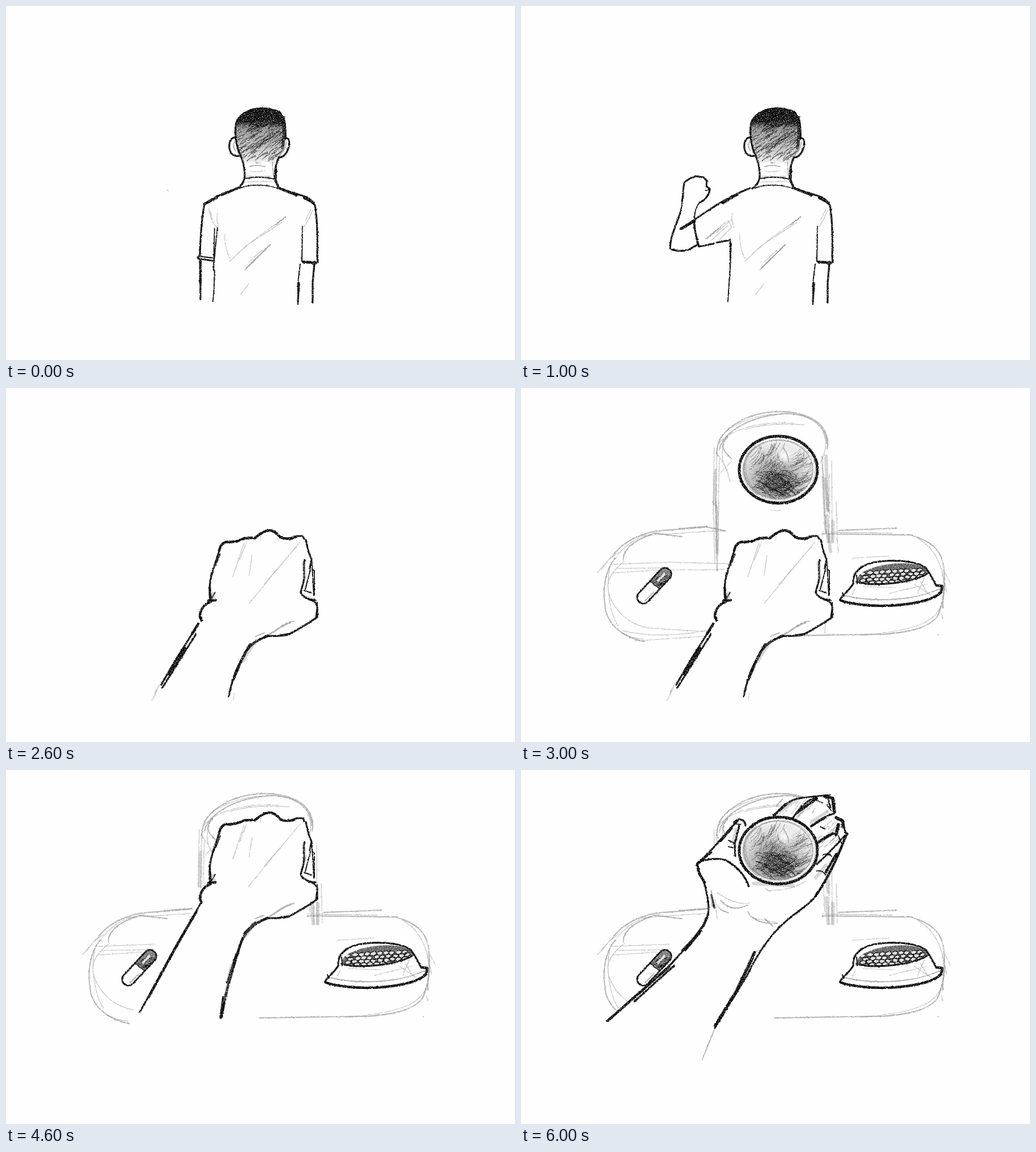
An HTML page that plays this animation: 898x624 px, repeating every 7 s.

```html
<!DOCTYPE html>
<html lang="en">
<head>
<meta charset="utf-8">
<title>Reaching hand</title>
<style>
html, body { margin: 0; width: 100%; height: 100%; overflow: hidden; background: #fefefe; }
svg { display: block; width: 898px; height: 624px; }
path, ellipse, rect { fill: none; stroke: #0c0c0c; stroke-width: 3.2; stroke-linecap: round; stroke-linejoin: round; }
.thin { stroke-width: 2; }
.bold { stroke-width: 4.4; }
.heavy { stroke-width: 5.6; }
.faint { stroke: #777; stroke-width: 1.1; opacity: .5; }
.soft { stroke: #777; stroke-width: 1.9; opacity: .6; }
.smudge { stroke: #777; stroke-width: 6; opacity: .32; }
.hatch { stroke-width: 1; }
.paper { fill: #fefefe; stroke: none; }
.shade { stroke: none; }

.shot {
  filter: url(#charcoal);
  visibility: hidden;
  animation: show1 7s step-end infinite;
  animation-delay: calc(var(--at) * 1s - 7s);
}
.for2 { animation-name: show2; }
.for4 { animation-name: show4; }
@keyframes show1 { 0% { visibility: visible } 14.2857%, 100% { visibility: hidden } }
@keyframes show2 { 0% { visibility: visible } 28.5714%, 100% { visibility: hidden } }
@keyframes show4 { 0% { visibility: visible } 57.1428%, 100% { visibility: hidden } }
</style>
</head>
<body>
<svg viewBox="0 0 898 624">
<defs>
  <!-- rough edges, then white paper grain on top of the ink -->
  <filter id="charcoal" filterUnits="userSpaceOnUse" x="0" y="0" width="898" height="624" color-interpolation-filters="sRGB">
    <feTurbulence type="fractalNoise" baseFrequency=".3" numOctaves="2" seed="4"/>
    <feColorMatrix values="1 0 0 0 0  0 1 0 0 0  0 0 1 0 0  0 0 0 0 1" result="wob"/>
    <feDisplacementMap in="SourceGraphic" in2="wob" scale="2.6" xChannelSelector="R" yChannelSelector="G" result="rough"/>
    <feTurbulence type="fractalNoise" baseFrequency=".6" numOctaves="2" seed="9"/>
    <feColorMatrix values="0 0 0 0 1  0 0 0 0 1  0 0 0 0 1  0 0 0 4 -2.3" result="grain"/>
    <feComposite in="grain" in2="rough" operator="atop"/>
  </filter>
  <linearGradient id="hair" x2="0" y2="1">
    <stop offset="0" stop-color="#0c0c0c"/>
    <stop offset=".22" stop-color="#0c0c0c" stop-opacity=".95"/>
    <stop offset=".36" stop-color="#222" stop-opacity=".5"/>
    <stop offset=".7" stop-color="#222" stop-opacity=".28"/>
    <stop offset="1" stop-color="#222" stop-opacity=".05"/>
  </linearGradient>
  <radialGradient id="ball" gradientUnits="userSpaceOnUse" cx="448" cy="168" r="82">
    <stop offset="0" stop-color="#222" stop-opacity=".8"/>
    <stop offset=".35" stop-color="#444" stop-opacity=".5"/>
    <stop offset=".7" stop-color="#777" stop-opacity=".3"/>
    <stop offset="1" stop-color="#999" stop-opacity=".05"/>
  </radialGradient>
  <radialGradient id="gleam">
    <stop offset="0" stop-color="#fefefe"/>
    <stop offset="1" stop-color="#fefefe" stop-opacity="0"/>
  </radialGradient>
  <path id="skull" class="shade" d="M413 266C406 250 403 225 406 207C409 195 420 187 436 182C455 178 474 181 484 190C492 197 494 212 493 232C492 250 487 262 481 270C476 280 470 281 466 277C452 273 432 274 420 279Z" style="fill:url(#hair)"/>
  <path id="food" class="shade" d="M592 339C594 320 640 309 670 309C695 309 714 314 717 324C714 335 680 343 640 346C615 347 595 345 592 339Z" style="fill:#666"/>
  <clipPath id="hairClip"><use href="#skull"/></clipPath>
  <clipPath id="foodClip"><use href="#food"/></clipPath>
  <clipPath id="ballClip"><ellipse cx="454" cy="144" rx="61" ry="52"/></clipPath>

  <g id="orb">
    <ellipse class="paper" cx="454" cy="144" rx="69" ry="60"/>
    <g clip-path="url(#ballClip)">
      <ellipse class="shade" cx="454" cy="144" rx="61" ry="52" style="fill:url(#ball)"/>
      <path class="hatch" opacity=".45" data-hatch="65,402,118,50,62,-55,30,5,6"/>
      <path class="hatch" opacity=".65" data-hatch="60,412,145,55,40,32,32,6,-6"/>
      <path class="hatch" opacity=".55" data-hatch="40,435,165,55,26,-25,30,7,6"/>
      <path class="hatch" opacity=".35" data-hatch="42,470,118,34,55,-32,28,8,6"/>
      <ellipse class="shade" cx="464" cy="119" rx="26" ry="18" style="fill:url(#gleam)"/>
    </g>
    <path class="smudge" d="M413 104C385 125 390 165 418 186"/>
    <ellipse class="soft" cx="454" cy="144" rx="61" ry="52"/>
    <ellipse class="faint" cx="455" cy="145" rx="64" ry="54"/>
    <ellipse cx="454" cy="144" rx="69" ry="59" style="stroke-width:5"/>
    <path d="M388 165C402 192 435 206 470 202C498 196 516 178 521 156"/>
    <path class="soft" d="M453 117Q452 128 463 132M463 106Q472 118 472 130"/>
  </g>

  <g id="hand">
    <path class="paper" d="M376 290C378 276 386 269 393 272L435 264C445 260 452 251 464 251C474 251 480 258 484 263C492 267 504 266 524 261L534 290L543 330L545 372L550 390L547 405C535 415 515 425 500 434L458 437L420 475L344 410L345 390L360 374L357 345Z"/>
    <path class="bold" d="M376 287C378 276 386 269 393 272L408 270L420 265L434 264M438 265C446 260 452 252 464 251C474 251 480 258 484 263C492 267 504 266 512 262"/>
    <path d="M511 261L524 261L526 266M529 268L534 290L539 302L536 318M376 288L368 312C362 330 357 345 360 373"/>
    <path class="thin" d="M378 292L370 313M360 345L362 372L369 360M539 302L541 328L543 366M541 320L544 322L544 365M537 320L528 355M526 357L539 361"/>
    <path d="M527 303C523 318 529 330 524 345L520 360C522 368 535 374 546 374"/>
    <path class="smudge" d="M525 308L527 335M365 362L367 372"/>
    <path class="bold" d="M357 375L370 374M361 377C350 381 343 390 342 402L345 410"/>
    <path d="M535 373C546 375 550 383 549 390L547 405C535 415 515 425 500 434C490 438 470 437 458 437"/>
    <path class="thin" d="M549 378L550 404L543 408M480 436L505 432"/>
    <path class="soft" d="M455 438C470 434 488 414 508 411M466 434C478 428 490 416 502 414M440 438L455 432"/>
    <path class="faint" d="M519 271L428 381M513 279L455 346M420 273Q411 300 400 333M424 272L412 303M434 295L429 330M450 258L449 268"/>
  </g>
</defs>

<!-- standing figure -->
<g class="shot for2" style="--at:0">
  <use href="#skull"/>
  <g clip-path="url(#hairClip)">
    <path class="hatch" data-hatch="130,398,205,90,70,-35,24,1,-3" opacity=".75"/>
    <path class="hatch" data-hatch="45,404,185,85,30,-10,26,2,-3"/>
    <path class="heavy" d="M484 188C491 205 492 230 488 250" opacity=".7"/>
  </g>
  <path d="M414 265C405 245 403 222 406 207C409 195 420 187 436 182C455 178 474 181 484 190C492 197 494 214 493 234"/>
  <path class="thin" d="M474 183L484 187L487 194L491 196L492 208"/>
  <path d="M405 232C397 231 393 240 394 250C396 262 403 266 412 264M494 233C500 232 501 242 498 251C495 261 489 266 483 267"/>
  <path class="soft" d="M404 238Q398 246 405 256M495 240Q493 248 488 258M490 248L483 264"/>
  <path d="M414 264C418 275 422 285 421 302C420 312 413 318 408 322M482 266C477 275 474 288 474 303C476 313 480 319 484 323"/>
  <path class="thin" d="M422 304Q447 299 474 305M413 321C430 314 462 314 480 322M477 280L477 308M476 306L481 318"/>
  <path class="soft" d="M430 283Q444 279 457 283M441 276L449 277M470 275L472 300"/>
  <path class="faint" d="M430 291Q444 294 457 290M424 300L468 300M420 310L470 309"/>
  <path d="M480 320C500 328 520 333 530 337C540 342 545 348 546 356C549 380 550 410 549 440L550 452"/>
  <path class="bold" d="M486 323L512 333M526 338L543 347M524 451L547 453"/>
  <path class="thin" d="M523 389L522 450L548 451M540 348L546 352M519 455L515 488L515 526"/>
  <path d="M544 455L541 488L541 523M517 488L515 521"/>
  <path class="faint" d="M541 360Q531 386 521 392M538 358L528 378M494 371C470 391 436 408 395 450M487 381L420 425M467 420L421 466M452 430L428 452M428 490L414 509M386 402Q385 425 395 445M373 365Q370 380 376 390"/>
  <path class="soft" d="M493 372L475 386M466 421L424 462"/>
</g>

<g class="shot" style="--at:0">
  <path d="M414 319C390 328 362 338 350 350C345 375 343 410 342 440L338 444"/>
  <path class="bold" d="M407 322L380 333M372 338L350 349M343 450L343 488"/>
  <path d="M343 486L343 517M338 445L364 449"/>
  <path class="thin" d="M340 441L364 444M373 391L369 430L366 466M368 392L366 465M368 465L367 500L365 521"/>
  <path class="faint" d="M357 354Q361 380 372 390M360 360L364 376M284 325L288 326"/>
</g>

<g class="shot" style="--at:1">
  <path d="M404 321C376 332 345 350 325 364L281 393"/>
  <path class="bold" d="M382 332L356 347M304 380L284 392"/>
  <path d="M284 344C287 335 285 318 289 310L300 303L308 300L322 302L328 308L327 318L333 322C333 332 325 342 316 346"/>
  <path class="thin" d="M316 346C309 352 306 365 306 378M284 344C285 353 280 368 274 382M326 325L333 323L330 335"/>
  <path d="M281 364C275 385 263 405 263 428C275 433 285 433 297 429L311 421"/>
  <path d="M307 377C304 390 310 408 314 424M314 424L340 419M345 417L367 413"/>
  <path class="thin" d="M304 380L311 419M369 411L369 460L365 521M371 418L368 480"/>
  <path class="faint" d="M328 411L362 380M336 413L366 386M350 412L370 392M344 400L372 376M365 378L372 390"/>
  <path class="soft" d="M326 410L352 390"/>
</g>

<!-- counter with capsule and bowl -->
<g class="shot for4" style="--at:3">
  <path class="soft" d="M346 120C342 85 370 65 400 52C435 38 480 38 510 52C535 64 545 85 540 108M350 110C352 82 400 48 470 45C518 47 538 72 540 98M372 125C352 108 352 98 365 86"/>
  <path class="faint" d="M347 100C370 70 430 58 480 62M349 92C362 66 415 46 455 46M345 115Q365 140 368 165M358 98Q350 125 364 145M352 150L372 128M395 73Q440 60 500 65M532 78Q545 100 528 132"/>
  <path class="faint" d="M341 105L339 206M345 120L344 208M350 125L348 205M531 155L536 250M548 128L549 270M556 200L558 270M544 150L543 272"/>
  <path class="smudge" d="M343 145L342 205M536 160L542 215M539 225L542 271M550 235L550 271"/>
  <path class="soft" d="M160 298C175 275 205 258 240 252L328 245M278 248L328 244M531 257L690 259M560 251L662 247M234 256L284 262"/>
  <path class="faint" d="M215 260L325 253M163 305C185 270 215 258 245 255M136 325Q154 300 172 290M142 320L158 298M160 311L262 307M162 326L240 321M170 318L252 317M532 254L655 256M585 300L650 296"/>
  <path class="soft" d="M231 258C195 270 178 288 181 304M166 300C146 325 143 360 150 395C158 420 180 440 218 447"/>
  <path class="faint" d="M182 306C150 330 148 352 160 375C175 405 200 418 225 423M157 315C148 350 158 400 172 420M176 430Q195 442 216 443"/>
  <path class="soft" d="M690 260C725 270 745 290 746 320C750 350 745 380 735 402C720 422 690 430 640 434M640 434L447 437M745 350L744 388"/>
  <path class="faint" d="M700 265C735 285 750 325 745 370C738 410 705 427 600 436M748 325L758 345M742 318L751 360M742 398L744 408M735 434L737 436"/>
  <g transform="translate(235 348.5) rotate(-47)">
    <rect class="paper" x="-39" y="-11" width="78" height="22" rx="11"/>
    <path class="shade" style="fill:#777" d="M2-10H28Q38-8 38 0T28 10H2Z"/>
    <path class="hatch" data-hatch="14,3,-8,24,15,15,12,11,1"/>
    <rect class="paper" x="9" y="-3" width="20" height="4" rx="2" opacity=".8"/>
    <rect x="-39" y="-11" width="78" height="22" rx="11" style="stroke-width:2.8"/>
    <path class="thin" d="M1-11L2 11"/>
    <path class="soft" d="M-30 6L-8 7"/>
  </g>
  <path class="paper" d="M583 345C584 325 600 313 620 308C650 302 695 303 714 318L733 348L743 349L741 360C730 372 700 380 660 383C620 386 580 380 563 373Z"/>
  <use href="#food"/>
  <path id="pebbles" clip-path="url(#foodClip)" style="fill:#ddd;stroke-width:1.3"/>
  <path d="M586 345C584 325 600 313 620 308C650 302 695 303 714 317C720 325 728 338 732 348"/>
  <path d="M592 342C620 350 690 345 717 327M586 345C580 356 572 360 564 371"/>
  <path class="bold" d="M563 374C580 381 620 386 660 383C700 380 730 372 741 360L743 349L733 348"/>
  <path class="thin" d="M567 361L570 367M592 330L593 345"/>
  <path class="soft" d="M572 366C615 377 690 377 738 354"/>
  <path class="faint" d="M590 352L584 366M694 346L724 366M704 340L716 360M650 362L716 346M712 334L700 362M604 350L660 352"/>
</g>

<g class="shot" style="--at:3">
  <path class="soft" d="M344 200L346 322M328 245L360 252M531 120L538 256"/>
  <path class="faint" d="M339 200L342 310M349 200L347 295M320 253L362 252M262 307L368 310M240 321L360 320M180 428C230 440 290 436 332 426M200 446L330 437M225 423L332 430M538 370L536 432M557 265L560 290M440 214Q448 218 458 215"/>
  <path class="smudge" d="M538 120L541 216M543 260L546 288M345 210L346 290"/>
  <use href="#orb"/>
</g>

<!-- fist, back of the hand -->
<g class="shot for2" style="--at:2">
  <path class="paper" d="M346 400L258 552L393 546L425 465L470 437Z"/>
  <use href="#hand"/>
  <path class="bold" d="M339 416L328 434M316 458L287 504"/>
  <path d="M340 415L300 478L274 523M335 434L276 528"/>
  <path class="faint" d="M275 515L258 551M266 530L261 544M403 538L401 550"/>
  <path class="bold" d="M462 437C440 445 428 455 422 468C415 482 406 495 402 512"/>
  <path d="M430 452C412 480 398 515 393 544M412 490L401 515"/>
  <path class="smudge" d="M442 445L424 470L418 482"/>
</g>

<g class="shot" style="--at:4">
  <path class="paper" d="M346 224L230 438L385 440L425 289L470 261Z"/>
  <use href="#hand" y="-176"/>
  <path d="M343 236L302 306L236 427"/>
  <path class="thin" d="M338 248L300 314L252 402"/>
  <path class="bold" d="M462 261C436 270 418 288 412 312C402 345 392 375 386 405L380 436"/>
  <path d="M440 268L420 288M406 325L390 375M383 400L378 437"/>
  <path class="smudge" d="M440 270L420 295M398 345L386 405"/>
</g>

<!-- fist, turned palm up -->
<g class="shot" style="--at:5">
  <path class="paper" d="M395 90L430 87L474 82L510 92L535 108L545 165C535 215 510 245 467 260L320 494L150 448L265 345L326 270L360 212L338 150Z"/>
  <path class="shade" style="fill:#aaa" opacity=".5" d="M414 142L446 140L446 176L436 178ZM448 152L474 152L470 172L448 172ZM486 154L512 154L504 174L488 176ZM516 156L538 153L530 174L514 174Z"/>
  <path class="hatch" opacity=".5" data-hatch="28,414,145,52,30,-60,12,21,0"/>
  <path class="bold" d="M395 93C375 108 350 125 341 145C341 165 352 180 358 200L361 212"/>
  <path class="thin" d="M338 150L350 135L360 136L370 137L385 134M347 148C345 170 356 185 356 203M348 154Q360 160 354 170"/>
  <path class="heavy" d="M361 218C340 240 328 252 325 270C315 295 290 320 265 345"/>
  <path class="bold" d="M265 345L150 447"/>
  <path class="smudge" style="opacity:.75;stroke:#333" d="M358 224L334 252M322 278L294 310L278 325"/>
  <path d="M296 312L255 358L165 443"/>
  <path class="heavy" d="M522 222C510 240 490 252 467 260C440 285 425 310 410 340"/>
  <path class="bold" d="M541 170C538 190 533 206 522 222M430 308L385 385L345 453"/>
  <path d="M412 335C385 385 350 440 320 494"/>
  <path d="M387 96L395 90L410 95L438 99C450 101 466 100 474 105C470 118 440 123 415 127C403 130 400 138 392 134M392 98C410 107 440 105 472 104"/>
  <path class="bold" d="M410 92L416 86L430 84M432 97C430 87 450 82 463 82C474 84 476 92 473 103M396 92L436 101M420 125L462 119"/>
  <path class="thin" d="M436 87L446 96M388 96L392 108L380 125L394 134M400 112Q420 122 450 112"/>
  <path d="M402 134C418 150 430 180 443 200"/>
  <path class="bold" d="M476 104L484 91C492 84 504 88 510 98M470 110C460 130 450 140 447 152C443 170 447 184 458 187C470 187 475 178 480 165L492 138L508 112"/>
  <path d="M510 98C506 112 496 126 488 146M484 90C474 108 462 128 455 146M510 100C522 98 535 108 534 119L514 148M490 146C484 165 484 182 492 184C505 187 512 178 517 163"/>
  <path class="bold" d="M516 150C525 152 536 148 541 135L544 166M456 186Q495 184 522 180L538 164M512 150L536 116"/>
  <path class="shade" style="fill:#0c0c0c" d="M541 142L546 166L531 160Z"/>
  <path class="thin" d="M530 112L540 126L538 138L524 150M446 152L474 153M486 154L512 153M462 182L482 170"/>
  <path class="soft" d="M363 219C390 222 425 230 449 249M414 150L446 152M428 214L422 208M448 215L454 216M394 108L384 130M372 122L380 130M438 198L450 192"/>
  <path class="faint" d="M375 220Q410 222 438 242M362 140Q385 136 402 146M362 160L368 190M400 215L425 220M390 345L410 310M160 452L205 412"/>
</g>

<!-- open palm holding the orb -->
<g class="shot" style="--at:6">
  <path class="paper" d="M382 88L445 80L480 52L545 42L555 70L570 88L576 112C560 160 540 195 515 232C500 248 470 262 455 275L342 455L320 510L152 443L265 350L330 262C335 240 328 210 312 185L309 165Z"/>
  <path class="smudge" d="M488 82L508 56M512 92L540 74M528 128L560 98M456 74L484 54M380 104L374 130M520 190L538 168M410 200L480 204"/>
  <path class="hatch" opacity=".4" data-hatch="20,450,52,90,30,-50,14,31,0"/>
  <path class="hatch" opacity=".4" data-hatch="22,520,88,40,50,-45,12,32,0"/>
  <path d="M384 88C365 105 345 135 313 163M376 92C386 83 396 88 396 98M385 98L377 130L378 152"/>
  <path class="bold" d="M372 102L352 125M335 145L313 164"/>
  <path d="M313 162C330 157 350 154 363 160C380 170 395 185 402 205"/>
  <path class="thin" d="M366 124L378 130M379 95L388 96M366 135L374 137"/>
  <path d="M311 164C312 185 325 193 327 215C333 240 332 255 325 268C305 300 280 325 262 345L152 443"/>
  <path class="bold" d="M311 166L314 182L324 198M330 255L322 274L306 296L285 318M262 346L153 442"/>
  <path d="M270 345L200 408M318 284L290 318M336 220L341 243"/>
  <path class="heavy" d="M412 322C400 350 390 368 380 390L343 450"/>
  <path class="bold" d="M575 112C560 150 545 185 520 222"/>
  <path d="M520 222C505 242 478 254 455 278C436 298 416 326 400 360L342 455"/>
  <path class="soft" d="M342 455L320 510M352 230Q372 252 400 238M352 246L366 252M336 212L337 240M400 250C408 266 430 272 452 270M405 258L414 262M430 262L444 275M432 210L440 214"/>
  <path class="faint" d="M346 216Q380 240 404 234M345 236Q350 248 362 250M410 262Q425 264 450 268M440 212Q480 212 502 196M342 228L346 262M395 355L420 312"/>
  <path d="M445 82C458 66 475 52 490 50C505 48 520 46 545 44M480 84C492 66 505 52 522 48M514 98C528 86 540 80 552 77"/>
  <path class="bold" d="M446 80L468 60M486 76L522 50M512 99L536 84M526 126L550 112M538 180L556 148"/>
  <path class="heavy" d="M535 46L550 50L553 74M556 84L568 90L568 100M560 96L556 114"/>
  <path d="M525 128C538 116 546 112 556 112M568 90L572 110L576 113M522 166C540 150 558 130 573 114M542 52L546 66"/>
  <path class="thin" d="M532 150Q540 145 548 152M522 178Q530 176 537 184M560 116L566 130M518 52L532 58M540 62L548 72M528 100L536 104"/>
  <use href="#orb" y="-2"/>
</g>
</svg>
<script>
function rng(seed) {
  return () => {
    seed = (seed * 16807 + 11) % 2147483647;
    return seed / 2147483647;
  };
}

// data-hatch: count, x, y, width, height, angle, length, seed, bend
function hatch(path) {
  const [count, x, y, w, h, angle, len, seed, bend] = path.dataset.hatch.split(',').map(Number);
  const rand = rng(seed * 7919);
  let d = '';
  for (let i = 0; i < count; i++) {
    const a = (angle + rand() * 16 - 8) * Math.PI / 180;
    const l = len * (.5 + rand() * .7);
    const dx = Math.cos(a) * l, dy = Math.sin(a) * l;
    const cx = dx / 2 - Math.sin(a) * bend, cy = dy / 2 + Math.cos(a) * bend;
    d += `M${x + rand() * w} ${y + rand() * h}q${cx} ${cy} ${dx} ${dy}`;
  }
  path.setAttribute('d', d);
}
document.querySelectorAll('[data-hatch]').forEach(hatch);

const rand = rng(4242);
let pebbles = '';
for (let row = 0; row < 4; row++) {
  for (let col = 0; col < 10; col++) {
    const x = 598 + col * 11 + row % 2 * 5 + rand() * 3;
    const y = 324 + row * 6 - col * .7 + rand() * 2;
    pebbles += `M${x} ${y}q5 -4 10 0q-1 5 -6 5q-5 0 -4 -5`;
  }
}
document.getElementById('pebbles').setAttribute('d', pebbles);
</script>
</body>
</html>
```
